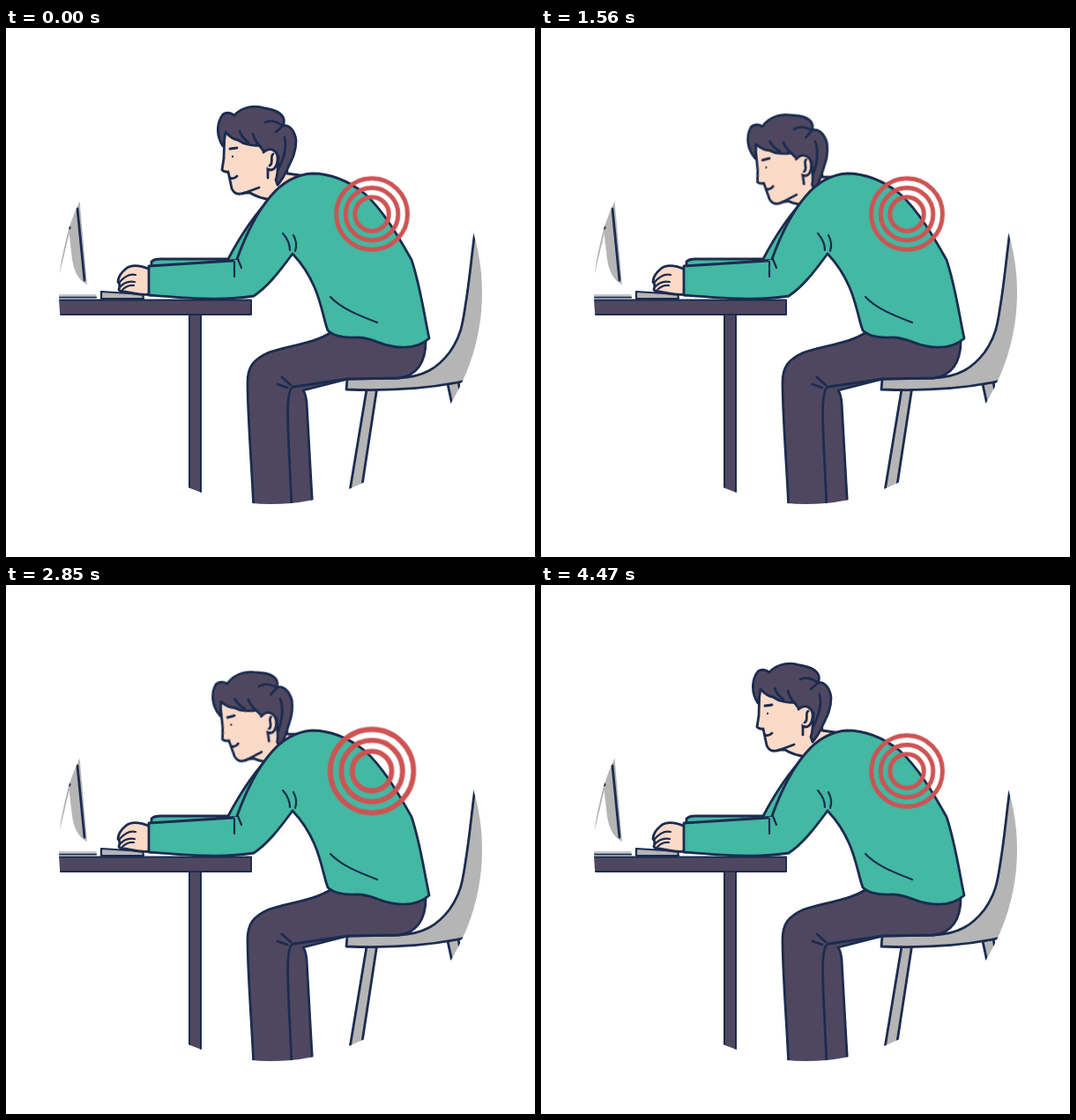
These frames come from a looping animation (600 px wide and 600 px high, 4.5 s). An HTML page without scripts:

```html
<!DOCTYPE html>
<html lang="en">
<head>
<meta charset="utf-8">
<title>Back pain at the desk</title>
<style>
  html, body { margin: 0; width: 100%; height: 100%; overflow: hidden; background: #fff; }
  svg { display: block; width: 100%; height: 100%; }
  .ink { stroke: #1b2c4f; stroke-width: 2.8; stroke-linecap: round; stroke-linejoin: round; }
  .line { fill: none; }
  .thin { stroke-width: 2.2; }
  .cloth { fill: #4f4760; }
  .shirt { fill: #43b8a3; }
  .skin { fill: #fbdac8; }
  .grey { fill: #b5b5b5; }
  .head { transform-origin: 350px 164px; animation: nod 4500ms infinite; }
  .rings {
    fill: none; stroke: #ce5352; stroke-width: 6.2;
    transform-origin: 415px 211px; animation: pulse 1500ms linear infinite;
  }
  @keyframes nod {
    0%, 44.444%, 83.333%, 100% { transform: rotate(0deg); animation-timing-function: ease-in-out; }
    13.333%, 33.333%, 55.556%, 72.222% { transform: rotate(-7.8deg); animation-timing-function: ease-in-out; }
  }
  @keyframes pulse {
    0%, 22% { transform: scale(.8); }
    24% { transform: scale(.81); }
    30% { transform: scale(.99); }
    32%, 83% { transform: scale(1); }
    88% { transform: scale(.965); }
    90% { transform: scale(.937); }
    96% { transform: scale(.82); }
    98%, 100% { transform: scale(.8); }
  }
</style>
</head>
<body>
<svg viewBox="0 0 600 600">
  <clipPath id="stage"><circle cx="300" cy="300" r="240"/></clipPath>

  <g clip-path="url(#stage)" class="ink">
    <!-- monitor and keyboard -->
    <g stroke="none">
      <path class="grey" d="M83 190L92 291Q78 284 75 262L71 228Z"/>
      <path class="grey" d="M58 285L72 222L73 228L61 278Z"/>
    </g>
    <path class="line" d="M81 205L89 286M72 226V227"/>
    <path class="line" style="stroke:#b5b5b5;stroke-width:1.5" d="M60 303H102"/>
    <path class="line thin" d="M55 305.500H102"/>
    <path class="grey thin" d="M108 299L155 302L156 307H108Z"/>

    <!-- desk -->
    <path class="cloth" style="stroke-width:2" d="M208 325H221V535H208ZM50 308.500H278V325H50Z"/>

    <!-- chair -->
    <path class="grey" d="M409 410H420.500L402.500 528L389.500 528ZM501 404L513 401L517 425L507 432Z"/>
    <path class="grey" d="M387 398L445 397C474 396 490 385 503 368C516 350 518 335 521 315C526 285 528 258 532 230L550 230V392C500 409 440 412 386 410Z"/>

    <!-- trousers -->
    <path class="cloth" d="M369 345C350 358 320 360 298 368C280 376 274 385 274 402C274 440 279 500 281 548H348C345 500 342 440 341 425Q340 415 337 411L388 398L445 397C465 395 477 380 476 352Z"/>
    <path class="line" d="M324 545C322 490 318 440 320 425Q321 408 326 407L388 398M313 396L323 405M308 404L319 408"/>

    <!-- head -->
    <g class="head">
      <path class="skin" d="M248 118L247 148L245 161Q248 164 252 163L256 182Q260 191 270 187L277 187Q286 193 302 195L340 190V168L319 165L315 110Z"/>
      <path class="line" d="M268 188L287 181M297 158V170M254 137L262 136M254 170Q258 172 262 168"/>
      <path class="line" style="stroke-width:2" d="M257 145.500V146"/>
      <path class="cloth" d="M246 134C238 122 239 107 246 98Q252 94 259 99C268 89 282 87 294 91Q312 94 315 103Q316 108 314 111C322 109 328 118 329 128C329 140 325 148 320 158Q315 170 308 178L306 172C309 165 308 155 309 145L293 141L287 133C280 134 270 132 263 127Q256 126 249 118Q248 125 246 134Z"/>
      <path class="line" d="M265 117Q268 125 275 130M280 120Q283 130 289 135M294 107Q304 103 314 111L306 118M316 124C319 136 314 150 309 160"/>
      <path class="skin" d="M292 141C300 134 309 139 308 150C307 159 302 163 297 160"/>
      <path class="line" d="M303 143C299 145 304 154 299 156"/>
    </g>

    <!-- hand -->
    <path class="skin" d="M164 274C152 269 142 268 136 273C130 278 127 284 127 288Q130 290 128 297Q130 300 134 299L145 301Q155 303 164 302Z"/>
    <path class="line thin" d="M128 289C134 282 140 278 147 280M129 294Q136 286 146 288M131 298Q137 291 145 292"/>

    <!-- shirt, far sleeve first -->
    <path class="shirt" d="M165 271V265Q168 262 175 262H252C262 243 278 215 302 191L280 262Z"/>
    <path class="shirt" stroke="none" d="M162 270L257 264L262 262C270 240 282 212 300 191Q320 167 347 165C368 165 388 173 407 188C428 207 446 238 460 263C470 293 474 324 480 352C470 361 455 364 438 361C419 358 417 351 398 351Q374 352 365 343C358 326 357 290 325 256C309 278 296 294 281 304C245 310 200 306 162 303Z"/>
    <path class="line" d="M257 264L162 270V303C200 306 245 310 281 304C296 294 309 278 325 256C357 290 358 326 365 343Q374 352 398 351C417 351 419 358 438 361C455 364 470 361 480 352C474 324 470 293 460 263C446 238 428 207 407 188C388 173 368 165 347 165Q320 167 300 191C282 212 270 240 262 262"/>
    <path class="line thin" d="M259 265V282M263 262L267 272M314 233Q322 242 322 252M326 235Q331 244 328 253M368 305C380 318 400 326 421 334"/>
  </g>

  <g class="rings">
    <circle cx="415" cy="211" r="50.500"/>
    <circle cx="415" cy="211" r="37.200"/>
    <circle cx="415" cy="211" r="24"/>
  </g>
</svg>
</body>
</html>
```
